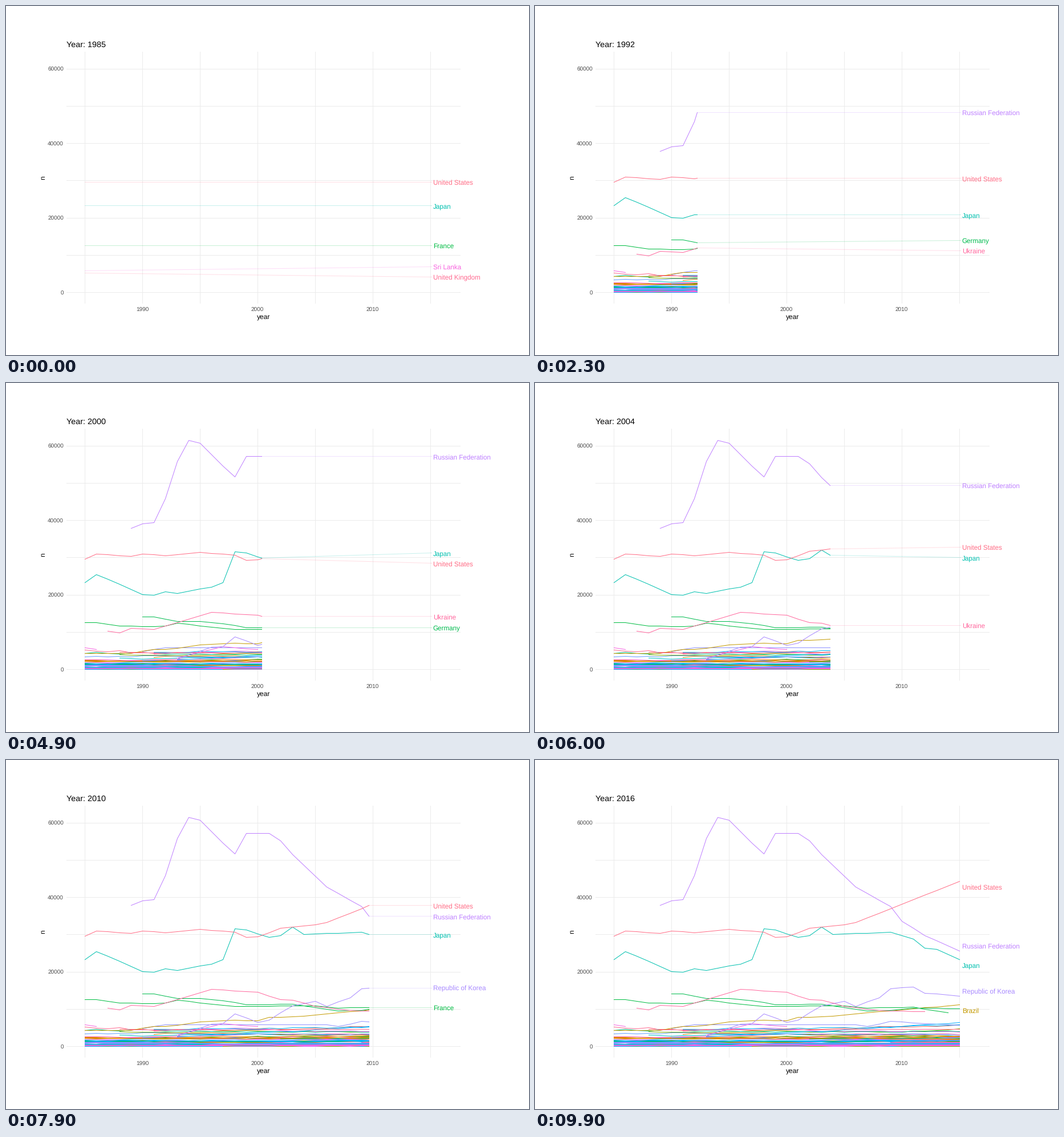
Write a matplotlib script that moves like this. It is 917 px wide and 611 px high and loops after 10000 ms.

```python
import numpy as np
import matplotlib.pyplot as plt
from matplotlib.animation import FuncAnimation

W, H, DPI = 917, 611, 100
FRAMES, YEARS, SPAN = 100, 31, 31
PX = 72 / DPI  # points per pixel

plt.rcParams.update({"font.family": "Liberation Sans", "text.hinting": "none"})
fig = plt.figure(figsize=(W / DPI, H / DPI), dpi=DPI, facecolor="white")
ax = fig.add_axes([0, 0, 1, 1])
ax.set(xlim=(0, W), ylim=(H, 0))
ax.axis("off")

RED, ORANGE, GOLD, OLIVE, GREEN, TEAL, CYAN, SKY, BLUE, VIOLET, MAGENTA, PINK = PALETTE = [
    "#F8766D", "#DE8C00", "#B79F00", "#7CAE00", "#00BA38", "#00C08B",
    "#00BFC4", "#00B4F0", "#619CFF", "#C77CFF", "#F564E3", "#FF64B0"]


def px(year):
    return 138 + 20.2 * np.asarray(year)


def py(value):
    return 501 - 6.525 * np.asarray(value)


def text(x, y, s, size, color="black", **kw):
    return ax.text(x, y, s, fontsize=size * PX, color=color, va="baseline", **kw)


def stroke(xs=(), ys=(), color="black", **kw):
    return ax.plot(xs, ys, color=color, lw=PX, snap=True, **kw)[0]


def draw_grid():
    for k in range(7):
        y, x = py(10 * k), px(5 * k)
        stroke([106, 796], [y, y], "#EBEBEB", zorder=1)
        stroke([x, x], [80, 520], "#EBEBEB", zorder=1)
    for v in range(0, 80, 20):
        text(101, py(v) + 4.5, str(v * 1000), 10, "#4D4D4D", ha="right")
    for year in (1990, 2000, 2010):
        text(px(year - 1985), 534.5, str(year), 10, "#4D4D4D", ha="center")
    text(451.5, 548, "year", 12, ha="center")
    text(70.5, 300.5, "n", 12, ha="right", rotation=90).set_va("center")


# Series, in thousands per year counted from 1985
lines = []
countries = {}


def add(values, color, start=0):
    s = np.full(YEARS, np.nan)
    s[start:start + len(values)] = values
    lines.append((stroke(color=color, zorder=3), s))
    return s


def trend(color, *points):
    """Add a series that runs straight between (year, value) points."""
    xs, ys = zip(*points)
    return add(np.interp(np.arange(xs[0], xs[-1] + 1), xs, ys), color, xs[0])


def country(name, color, *points):
    countries[name] = trend(color, *points), color


def add_crowd():
    rng = np.random.default_rng(8)

    def wander(level, start=0):
        n = YEARS - start
        walk = np.cumsum(rng.normal(0, 0.03, n))
        walk -= np.linspace(0, walk[-1], n)
        drift = np.linspace(1, rng.uniform(0.8, 1.25), n)
        return np.maximum(level * drift + walk * (0.3 + level), 0.02)

    for _ in range(44):
        start = 0 if rng.random() < 0.55 else rng.integers(1, 18)
        s = wander(2.5 * rng.random() ** 1.8, start)
        if rng.random() < 0.3:
            cut = rng.integers(2, len(s) - 2)
            s[cut:cut + 3] = np.nan
        add(s, PALETTE[rng.integers(12)], start)
    for k, level in enumerate(np.linspace(2.7, 4.9, 9)):
        add(wander(level, k % 3 * 3), PALETTE[(11 + 7 * k) % 12], k % 3 * 3)
    for level, color in ((2.2, ORANGE), (1.5, SKY), (0.8, BLUE), (0.25, MAGENTA)):
        for shift in (-0.12, 0, 0.12):
            add(wander(level + shift), color)


draw_grid()
add_crowd()
trend("#8F91FF", (5, 4.8), (7, 5.8), (21, 5.9), (22, 5.4), (24, 6.7), (30, 5.6))
trend("#00A9FF", (8, 2.6), (19, 4.2), (30, 6.4))
trend(MAGENTA, (8, 3.0), (12, 6.1), (15, 5.3))
country("Brazil", "#C49A00", (0, 4.3), (4, 4.3), (6, 5.4), (7, 5.3), (10, 6.6),
        (13, 7.0), (15, 6.9), (16, 7.8), (18, 7.9), (30, 11.2))
country("France", "#00BC42", (0, 12.6), (1, 12.6), (3, 11.7), (5, 11.5), (7, 11.6),
        (8, 12.4), (13, 10.7), (20, 10.9), (22, 10.3), (26, 10.5), (29, 9.0))
country("Germany", "#00BB4E", (5, 14.1), (6, 14.1), (8, 12.8), (10, 12.9),
        (12, 12.3), (14, 11.2), (18, 11.3), (22, 9.5), (24, 9.7), (26, 10.3), (30, 10.1))
country("Japan", "#00C0AF", (0, 23.3), (1, 25.5), (5, 20.1), (6, 19.9), (7, 20.9),
        (8, 20.4), (11, 22.1), (12, 23.3), (13, 31.5), (14, 31.3), (16, 29.2),
        (17, 29.8), (18, 32.0), (19, 30.1), (24, 30.6), (26, 28.8), (27, 26.4),
        (28, 26.1), (30, 23.3))
country("Republic of Korea", "#A98AFF", (8, 2.8), (11, 6.0), (12, 6.1), (13, 8.7),
        (15, 6.5), (16, 7.1), (18, 10.9), (20, 12.1), (21, 10.8), (23, 13.0),
        (24, 15.5), (26, 16.0), (27, 14.3), (30, 13.5))
country("Russian Federation", "#BF80FF", (4, 37.9), (5, 39.1), (6, 39.4), (7, 45.8),
        (8, 55.8), (9, 61.5), (10, 60.7), (13, 51.6), (14, 57.2), (16, 57.1),
        (17, 55.2), (18, 51.5), (21, 42.8), (24, 37.5), (25, 33.6), (27, 29.8),
        (30, 25.6))
country("Sri Lanka", "#F863DF", (0, 5.8), (1, 5.4))
country("Ukraine", "#FF689E", (2, 10.2), (3, 9.8), (4, 11.0), (6, 10.8), (11, 15.3),
        (15, 14.5), (17, 12.6), (18, 12.4), (20, 10.8), (23, 9.6), (27, 9.3))
country("United Kingdom", "#FF6A90", (0, 5.2), (2, 4.7), (3, 5.0), (4, 4.4), (30, 4.6))
country("United States", "#FF6C85", (0, 29.6), (1, 31.0), (4, 30.3), (5, 31.0),
        (7, 30.5), (10, 31.4), (13, 30.7), (14, 29.3), (15, 29.4), (17, 31.7),
        (20, 32.7), (21, 33.3), (30, 44.3))

title = text(106, 71.5, "", 14.4)
tags = [text(748.8, 0, "", 11.6, zorder=5) for _ in range(5)]
leads = [stroke(alpha=0.22, zorder=2) for _ in range(5)]

# Each year lands on a whole frame; the head moves linearly between them
KEYS = np.round(np.arange(YEARS) * (FRAMES - 1) / SPAN)


def at(s, t):
    a = int(t)
    f = t - a
    return s[a] if f == 0 else s[a] * (1 - f) + s[a + 1] * f


def top(year):
    live = [n for n, (s, _) in countries.items() if not np.isnan(s[year])]
    best = sorted(live, key=lambda n: -countries[n][0][year])[:5]
    return [n for n in best if n != "Ukraine" or year > 4]


def repel(ys, gap=18.2):
    ys = list(ys)
    for _ in range(80):
        for k in range(len(ys) - 1):
            push = (gap - ys[k + 1] + ys[k]) / 2
            if push > 0:
                ys[k] -= push
                ys[k + 1] += push
    return ys


def place_labels(t):
    after = top(int(np.ceil(t)))
    names = [n for n in top(int(t)) if n in after]
    names.sort(key=lambda n: -at(countries[n][0], t))
    heads = [float(py(at(countries[n][0], t))) for n in names]
    done = t >= YEARS - 1
    if done:  # labels dodge the line ends
        ys = [y + (9.5 if k % 2 == 0 else -9) for k, y in enumerate(heads)]
    else:
        ys = repel(heads)
    for tag, lead in zip(tags, leads):
        tag.set_text("")
        lead.set_data([], [])
    for name, head, y, tag, lead in zip(names, heads, ys, tags, leads):
        color = countries[name][1]
        tag.set(text=name, color=color, y=y + 5.2)
        if not done:
            lead.set_data([px(t), 746], [head, y])
            lead.set_color(color)


def draw(i):
    t = float(np.interp(i, KEYS, np.arange(YEARS)))
    past = np.arange(int(t) + 1)
    xs = px(np.append(past, t))
    for line, s in lines:
        line.set_data(xs, py(np.append(s[past], at(s, t))))
        line.set_visible(t > 0)
    place_labels(t)
    title.set_text(f"Year: {round(1985 + i * SPAN / (FRAMES - 1))}")
    return []


anim = FuncAnimation(fig, draw, frames=FRAMES, interval=100, repeat=True,
                     init_func=lambda: draw(0))
plt.show()
```
